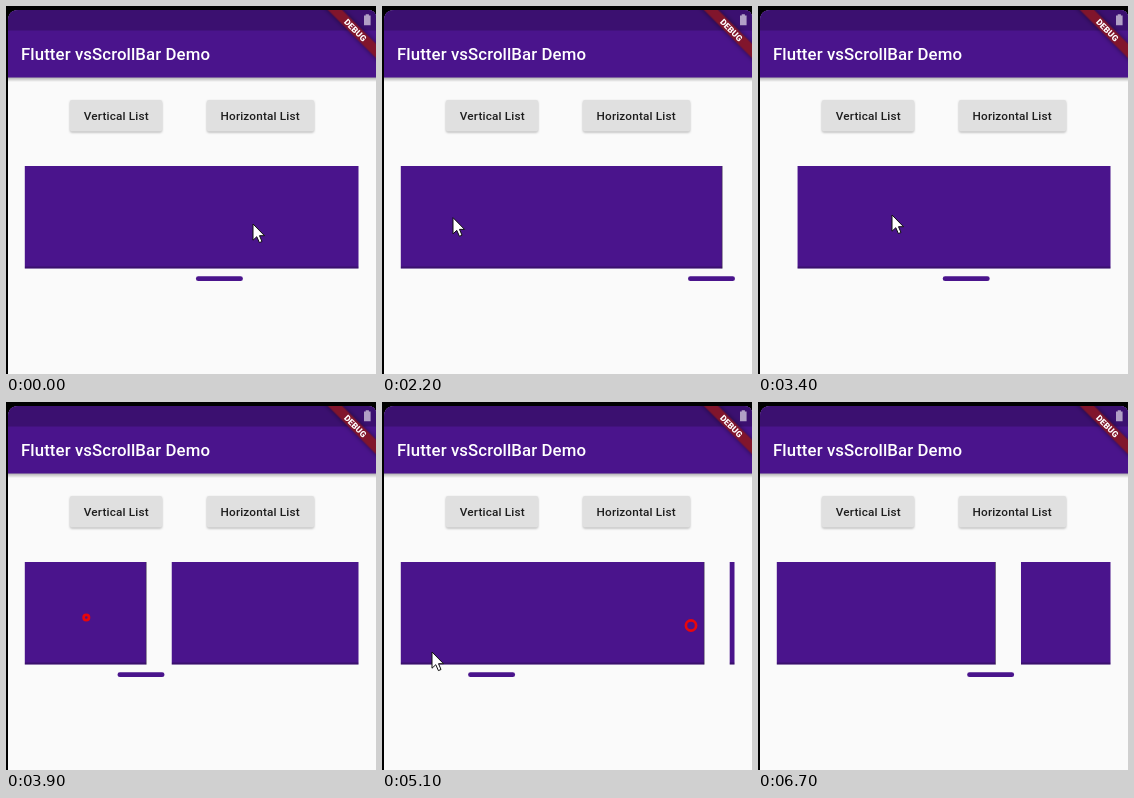
An HTML page for the animation above (6.8 s loop, 370 by 368 pixels).

```html
<!DOCTYPE html>
<html lang="en">
<head>
<meta charset="utf-8">
<title>Scroll bar demo</title>
<style>
html, body { margin: 0; width: 100%; height: 100%; overflow: hidden; background: #000; }
svg { display: block; width: 370px; height: 368px; }
text { font-family: Roboto, sans-serif; font-weight: 500; }
.button rect { fill: #e0e0e0; filter: drop-shadow(0 1.2px 1px rgba(0,0,0,.28)); }
.button text { font-size: 11.76px; letter-spacing: .17px; fill: rgba(0,0,0,.87); }
</style>
</head>
<body>
<svg viewBox="0 0 370 368">
  <defs>
    <clipPath id="screen"><path d="M2 368V15Q2 4 13 4H362Q370 4 370 12V368Z"/></clipPath>
    <clipPath id="viewport"><rect x="18.8" y="160" width="333.7" height="103"/></clipPath>
    <linearGradient id="shade" x2="0" y2="1">
      <stop stop-color="#000" stop-opacity=".32"/>
      <stop offset="1" stop-color="#000" stop-opacity="0"/>
    </linearGradient>
  </defs>
  <rect width="370" height="368"/>
  <g clip-path="url(#screen)">
    <rect width="370" height="368" fill="#fafafa"/>
    <rect y="71" width="370" height="5" fill="url(#shade)"/>
    <rect width="370" height="71.5" fill="#4a148c"/>
    <rect width="370" height="24.5" fill="#3b1070"/>
    <path d="M358 9.5h1.7v-1.3h3.2v1.3h1.7v9.8h-6.6z" fill="#b1a0c6"/>
    <text x="15" y="54.3" font-size="16.8" letter-spacing=".1" fill="#fff">Flutter vsScrollBar Demo</text>
    <g transform="translate(369.5 4) rotate(45)">
      <rect x="-40" y="23.5" width="80" height="10.1" fill="#81152c" style="filter:drop-shadow(0 0 2.5px rgba(0,0,0,.5))"/>
      <text y="31.6" font-size="8.6" style="font-weight:900" text-anchor="middle" fill="#fff">DEBUG</text>
    </g>
    <g class="button">
      <rect x="64" y="94" width="92" height="31.5" rx="1.7"/>
      <text x="77.8" y="114">Vertical List</text>
    </g>
    <g class="button">
      <rect x="201" y="94" width="107" height="31.5" rx="1.7"/>
      <text x="214.5" y="114">Horizontal List</text>
    </g>
    <g clip-path="url(#viewport)"><g id="cards"></g></g>
    <rect id="thumb" y="270.3" width="47" height="4.8" rx="2.4" fill="#4a148c"/>
  </g>
  <circle id="ring" fill="none" stroke="#e8060c" stroke-width="2.7"/>
  <path id="cursor" d="M0 0V16.2L3.8 12.7L6.4 18.6L9 17.5L6.5 11.7H11.5Z" fill="#fff" stroke="#111" stroke-width="1"/>
</svg>
<script>
const LOOP = 6800, LEFT = 19, VIEW = 334, THUMB = 47;
const COUNT = 6, PITCH = 398.5, MARGIN = 12.75;
const MAX = COUNT * PITCH - VIEW;
const FRICTION = 2.02, SPRING = 14;
const $ = id => document.getElementById(id);

// Each swipe: press and release times, offset at release, coasting distance.
const swipes = [
  { down: -1, up: 0, x: 1225, a: 0 },
  { down: 860, up: 1030, x: 1396, a: 1063, ring: 860, at: [238.5, 227.5] },
  { down: 2660, up: 2800, x: 1777, a: -839, ring: 2760, at: [73, 200.7] },
  { down: 3770, up: 3900, x: 663, a: -1250, ring: 3770, at: [80.3, 215.5] },
  { down: 4760, up: 4985, x: 241, a: 1158, ring: 4760, at: [309, 223.5] }
];

// Cursor stops: time, x, y, easing power.
const path = [
  [0, 247, 218], [400, 247, 218], [600, 259, 231], [700, 259, 231],
  [860, 238, 227], [1030, 67, 233, 2], [1500, 67, 233], [2550, 73, 201],
  [2660, 73, 201], [2800, 353, 200, 2], [3100, 353, 200], [3500, 61, 212],
  [3700, 80, 215], [3770, 80, 215], [3900, 465, 160, 2], [4030, 420, -20],
  [4100, 348, 17], [4200, 343, 165], [4650, 309, 223], [4760, 309, 223],
  [4985, 50, 250, 2], [5350, 50, 250], [5600, 46, 341], [5720, 46, 395]
];

const cards = $('cards');
for (let i = 0; i < COUNT; i++) {
  const x = LEFT + i * PITCH + MARGIN, w = PITCH - 2 * MARGIN;
  cards.innerHTML += `<rect x="${x}" y="160" width="${w}" height="102.5" fill="#4a148c"/>
    <path d="M${x} 261.5h${w}" stroke="#000" stroke-opacity=".22" stroke-width="2"/>
    <path d="M${x + w} 160v102.5" stroke="#333" stroke-opacity=".45"/>`;
}

function coast(s, t) {
  const dt = (t - s.up) / 1000;
  const x = s.x + s.a * (1 - Math.exp(-FRICTION * dt));
  if (x >= 0 && x <= MAX) return x;
  // Past the end: spring back from the moment the edge was crossed.
  const edge = x < 0 ? 0 : MAX;
  const left = 1 - (edge - s.x) / s.a;
  const over = dt + Math.log(left) / FRICTION;
  return edge + s.a * FRICTION * left * over * Math.exp(-SPRING * over);
}

function offset(t) {
  let i = swipes.length - 1;
  while (t < swipes[i].down) i--;
  const s = swipes[i];
  if (t >= s.up) return coast(s, t);
  const from = coast(swipes[i - 1], s.down);
  const p = (t - s.down) / (s.up - s.down);
  return from + (s.x - from) * p * p;
}

function cursorAt(t) {
  const i = path.findIndex(k => k[0] > t);
  if (i < 0) return path[path.length - 1].slice(1, 3);
  const [a, b] = [path[i - 1], path[i]];
  const p = ((t - a[0]) / (b[0] - a[0])) ** (b[3] || 1);
  return [a[1] + (b[1] - a[1]) * p, a[2] + (b[2] - a[2]) * p];
}

function draw(t) {
  const x = offset(t);
  cards.setAttribute('transform', `translate(${-x} 0)`);
  const part = Math.min(1, Math.max(0, x / MAX));
  $('thumb').setAttribute('x', LEFT + part * (VIEW - THUMB));
  $('cursor').setAttribute('transform', `translate(${cursorAt(t)})`);
  const hit = swipes.find(s => t >= s.ring && t < s.ring + 450);
  const ring = $('ring');
  ring.style.display = hit ? '' : 'none';
  if (hit) {
    ring.setAttribute('cx', hit.at[0]);
    ring.setAttribute('cy', hit.at[1]);
    ring.setAttribute('r', 1.2 + (t - hit.ring) * .0115);
  }
}

const start = performance.now();
function tick() {
  // The picture advances in steps of 100 ms.
  draw(Math.floor((performance.now() - start) % LOOP / 100) * 100);
  requestAnimationFrame(tick);
}
tick();
</script>
</body>
</html>
```
